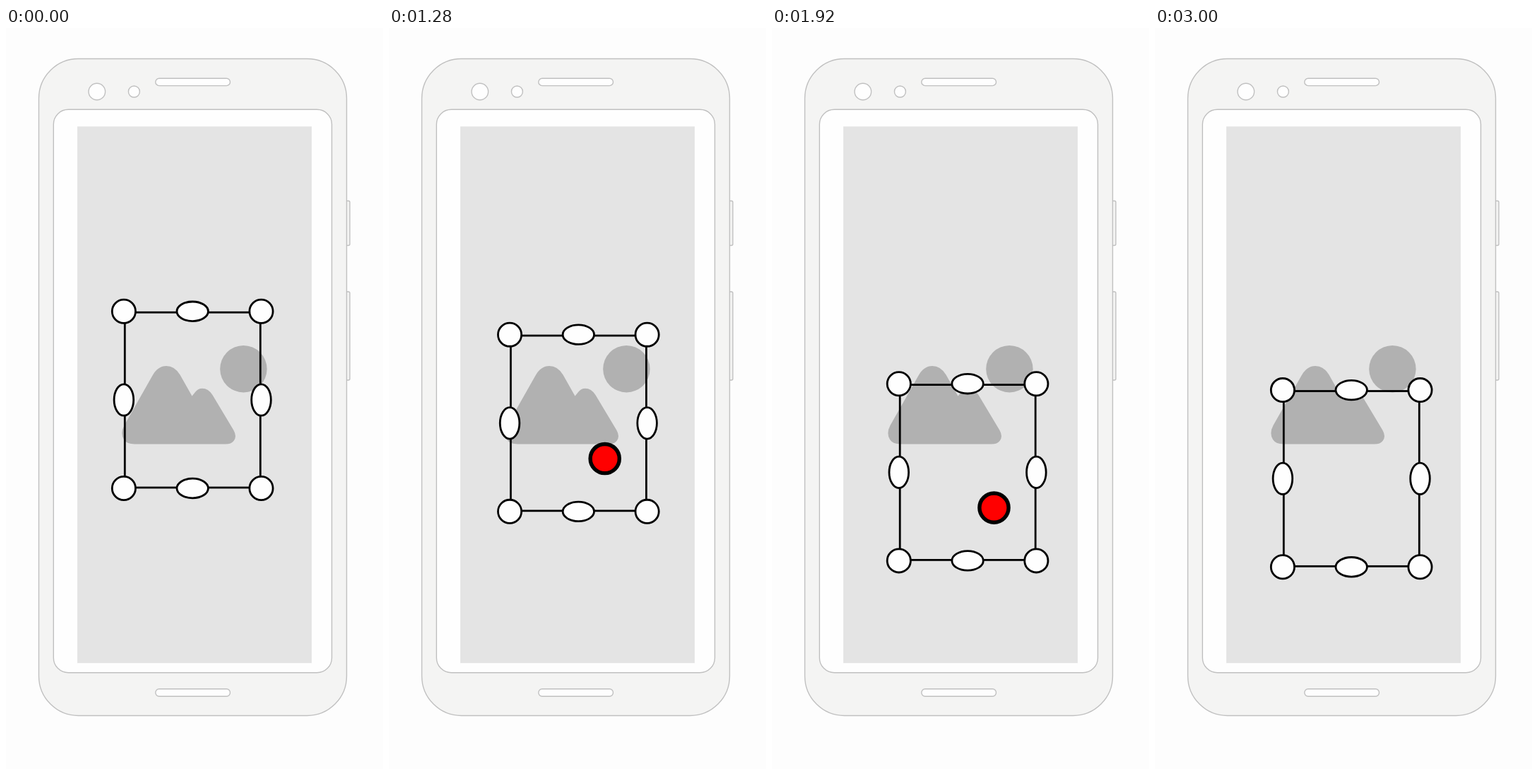
An HTML page that plays this animation: 534x1048 px, repeating every 3840 ms.

```html
<!DOCTYPE html>
<html lang="en">
<head>
<meta charset="utf-8">
<title>Dragging a crop frame</title>
<style>
  html, body { margin: 0; width: 100%; height: 100%; overflow: hidden; background: #fdfdfd; }
  svg { display: block; width: 100%; height: 100%; }
</style>
</head>
<body>
<svg viewBox="0 0 534 1048">
  <g fill="#fefefe" stroke="#c0c0c0" stroke-width="1.4">
    <path fill="#f4f4f3" d="M482.5 244.5h2.5q2 0 2 2v59q0 2-2 2h-2.5M482.5 373h2.5q2 0 2 2v121q0 2-2 2h-2.5"/>
    <rect x="46.5" y="43.5" width="436" height="929" rx="56" fill="#f4f4f3"/>
    <rect x="67.3" y="115.3" width="394.2" height="796.4" rx="21"/>
    <rect x="211.8" y="71.2" width="105.7" height="10.4" rx="5.2"/>
    <rect x="211.8" y="934.8" width="105.7" height="10.4" rx="5.2"/>
    <circle cx="128.8" cy="90" r="11.8"/>
    <circle cx="181.4" cy="90" r="8"/>
  </g>
  <rect x="101" y="139.3" width="332" height="758.9" fill="#e4e4e4"/>
  <g fill="#b1b1b1">
    <circle cx="336.4" cy="482.2" r="33.2"/>
    <path d="M167.5 562L207.5 491.5Q215 478 227 478Q239 478 246.5 490.5L263.5 520.5L268 515
      Q272 509.8 278 509.8Q286.500 509.800 292.500 519L322.500 569Q327.500 578 322.500 584Q319 588.500 311 588.500
      H182Q171 588.500 167 582Q161.500 573 167.500 562Z"/>
  </g>
  <g id="crop" stroke="#000" stroke-width="2.8" fill="#fefefe">
    <rect x="168.3" y="402.2" width="192" height="247.800" fill="none"/>
    <g id="handles"></g>
    <circle id="touch" cx="301.600" cy="576.200" r="20.600" fill="#f00" stroke-width="5.400"/>
  </g>
</svg>
<script>
const LOOP = 3840, STEP = 40;
const DRAG = { x: 14, y: 111.3 };
const crop = document.getElementById('crop');
const touch = document.getElementById('touch');

// Corner handles are round, edge handles are ovals lying along their edge.
const columns = [166.9, 264.2, 361.5], rows = [400.8, 526, 651];
document.getElementById('handles').innerHTML = rows.flatMap((cy, row) =>
  columns.map((cx, col) => {
    if (row === 1 && col === 1) return '';
    const rx = col === 1 ? 22.2 : row === 1 ? 13.8 : 16.6;
    const ry = row === 1 ? 22.2 : col === 1 ? 13.8 : 16.6;
    return `<ellipse cx="${cx}" cy="${cy}" rx="${rx}" ry="${ry}"/>`;
  })).join('');

const bezier = (s, a, b) => 3 * s * (1 - s) ** 2 * a + 3 * s * s * (1 - s) * b + s ** 3;

// Standard "ease" curve: cubic-bezier(.25, .1, .25, 1)
function ease(time, start, duration) {
  const x = (time - start) / duration;
  if (x <= 0) return 0;
  if (x >= 1) return 1;
  let low = 0, high = 1;
  for (let i = 0; i < 24; i++) {
    const mid = (low + high) / 2;
    if (bezier(mid, .25, .25) < x) low = mid; else high = mid;
  }
  return bezier(low, .1, 1);
}

function render(time) {
  const moved = ease(time, 1000, 1400);
  crop.setAttribute('transform', `translate(${DRAG.x * moved} ${DRAG.y * moved})`);
  touch.setAttribute('opacity', ease(time, 400, 400) - ease(time, 2600, 400));
}

const start = performance.now();
function tick() {
  const time = (performance.now() - start) % LOOP;
  render(Math.floor(time / STEP) * STEP);
  requestAnimationFrame(tick);
}
tick();
</script>
</body>
</html>
```
